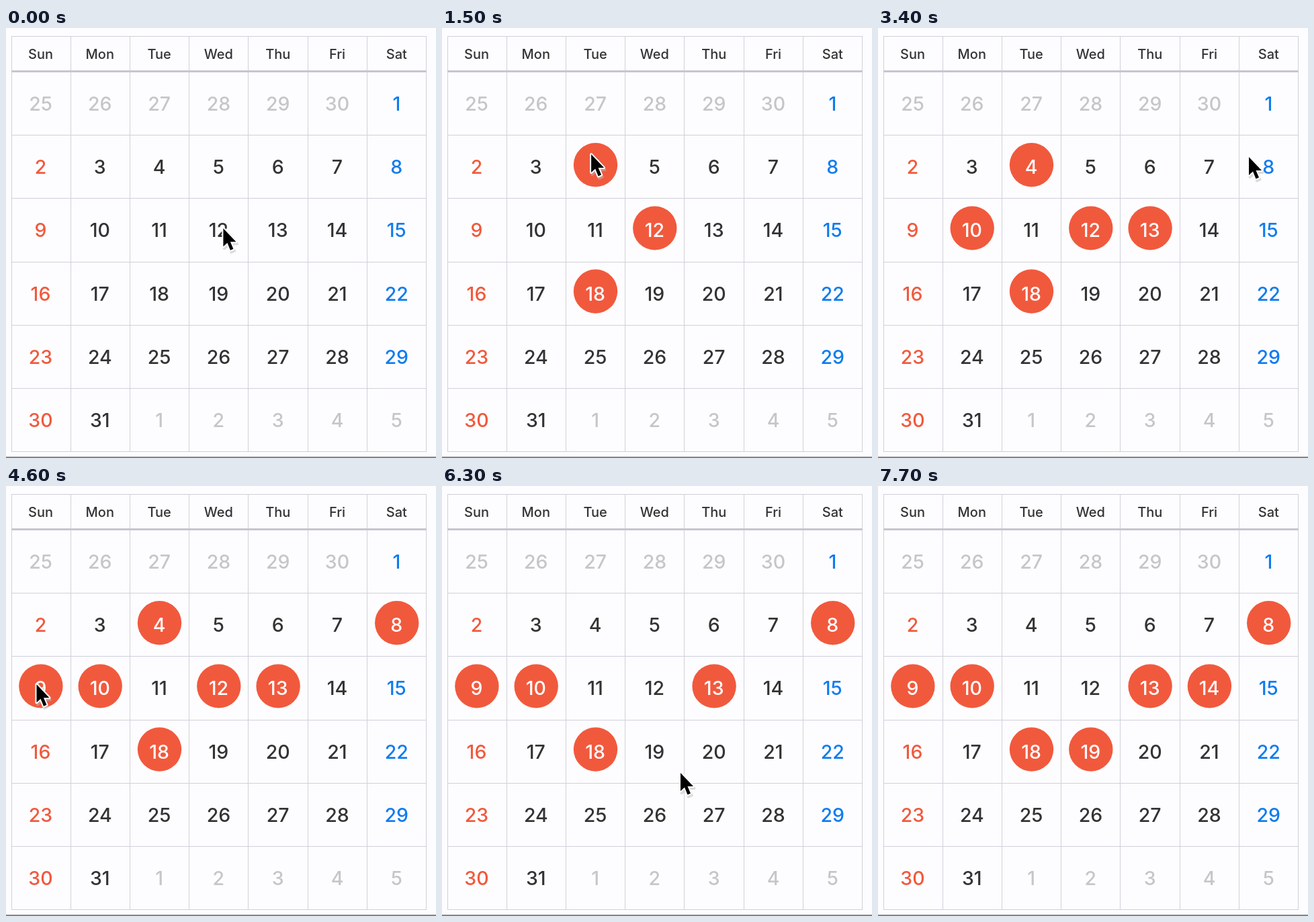
Write an HTML page that moves like this. It is 640 px wide and 640 px high and loops after 7800 ms.

```html
<!DOCTYPE html>
<html lang="en">
<head>
<meta charset="utf-8">
<title>Calendar selection</title>
<style>
  html, body { margin: 0; width: 100%; height: 100%; overflow: hidden; background: #fdfdff; }
  svg { display: block; width: 100vw; height: 100vh; }
  text { font-family: Inter, "Liberation Sans", sans-serif; font-weight: 500; text-anchor: middle; }
</style>
</head>
<body>
<svg viewBox="0 0 640 640">
  <rect width="640" height="640" fill="#fdfdff"/>
  <g id="grid"></g>
  <g id="cells"></g>
  <g id="cursor" stroke-linejoin="round">
    <path d="M0 0V27L6 21.5L10.5 32.5L15 30.5L10.5 20H19Z" transform="translate(1.5 3)" fill="#bbb" stroke="#bbb" stroke-width="4" opacity=".5"/>
    <path d="M0 0V27L6 21.5L10.5 32.5L15 30.5L10.5 20H19Z" stroke="#fff" stroke-width="4" paint-order="stroke"/>
  </g>
</svg>
<script>
const LOOP = 7800, STEP = 100, DWELL = 150;
const LEFT = 8, COL = 88.24, TOP = 65.3, ROW = 94.25;
const DARK = '#333333', MUTED = '#c6c6ca', CORAL = '#f1593d', BLUE = '#107cee';
const LINE = '#d0d0da', WHITE = '#ffffff';

const byId = id => document.getElementById(id);
function add(parent, tag, attrs, content = '') {
  const node = document.createElementNS('http://www.w3.org/2000/svg', tag);
  for (const key in attrs) node.setAttribute(key, attrs[key]);
  node.textContent = content;
  return parent.appendChild(node);
}

const grid = byId('grid'), cells = byId('cells');
const columnX = c => Math.floor(LEFT + c * COL) + 0.5;
const rowY = r => Math.floor(TOP + r * ROW) + 0.5;
const rule = (x1, y1, x2, y2, stroke = LINE, width = 1) =>
  add(grid, 'line', { x1, y1, x2, y2, stroke, 'stroke-width': width });
const across = (y, stroke, width) => rule(LEFT, y, columnX(7) + 0.5, y, stroke, width);

for (let c = 0; c <= 7; c++) rule(columnX(c), 12, columnX(c), rowY(6));
for (let r = 1; r <= 6; r++) across(rowY(r));
across(12.5);
across(64.5, '#c6c6ce', 3);
rule(0, 639, 640, 639, '#858585', 2);

// Day 1 falls on the last column of the first row
const center = date => {
  const i = date + 5;
  return [51.5 + i % 7 * 88.3, 113 + Math.floor(i / 7) * 94.1];
};

['Sun', 'Mon', 'Tue', 'Wed', 'Thu', 'Fri', 'Sat'].forEach((name, c) =>
  add(cells, 'text', { x: center(c - 5)[0], y: 45.5, 'font-size': 20, fill: DARK }, name));

const days = [];
for (let date = -5; date <= 36; date++) {
  const [x, y] = center(date), weekday = (date + 5) % 7;
  const inMonth = date >= 1 && date <= 31;
  const label = inMonth ? date : date < 1 ? date + 30 : date - 31;
  const color = !inMonth ? MUTED : weekday === 0 ? CORAL : weekday === 6 ? BLUE : DARK;
  const disc = add(cells, 'circle', { cx: x + 0.4, cy: y - 3.3, r: 32.7, fill: CORAL });
  const text = add(cells, 'text', { x, y: y + 10.2, 'font-size': 28.5, fill: color }, label);
  days.push({ date, disc, text, color });
}

// The pointer rests around each click and only passes through plain points.
const click = (at, date, dx = -6, dy = -6) => {
  const [x, y] = center(date);
  return { at, date, x: x + dx, y: y + dy, rest: DWELL };
};
const pass = (at, x, y) => ({ at, x, y, rest: 0 });

const route = [
  click(300, 12, 7, -3), click(900, 18), click(1500, 4, -6, -19), click(2100, 13),
  pass(2600, 152, 357), click(2900, 10), pass(3400, 552, 192), click(3700, 8),
  click(4500, 9), click(5200, 4), click(5800, 12), pass(6300, 355, 427),
  click(6600, 19), click(7100, 14), pass(7600, 600, 660)
];

function pointerAt(t) {
  const i = route.findIndex(p => p.at + p.rest >= t);
  if (i < 0) return [route.at(-1).x, route.at(-1).y];
  const to = route[i], from = route[i - 1] || to;
  const leave = from.at + from.rest, arrive = to.at - to.rest;
  const u = i ? Math.min(1, (t - leave) / (arrive - leave)) : 1;
  const e = u * u * (3 - 2 * u);
  return [from.x + (to.x - from.x) * e, from.y + (to.y - from.y) * e];
}

function render(t) {
  const selected = new Set();
  for (const { at, date } of route) {
    if (date && at <= t && !selected.delete(date)) selected.add(date);
  }
  for (const { date, disc, text, color } of days) {
    const on = selected.has(date);
    disc.setAttribute('visibility', on ? 'visible' : 'hidden');
    text.setAttribute('fill', on ? WHITE : color);
  }
  byId('cursor').setAttribute('transform', `translate(${pointerAt(t)})`);
}

const start = performance.now();
function tick() {
  const t = (performance.now() - start) % LOOP;
  render(Math.floor(t / STEP) * STEP);
  requestAnimationFrame(tick);
}
render(0);
requestAnimationFrame(tick);
</script>
</body>
</html>
```
